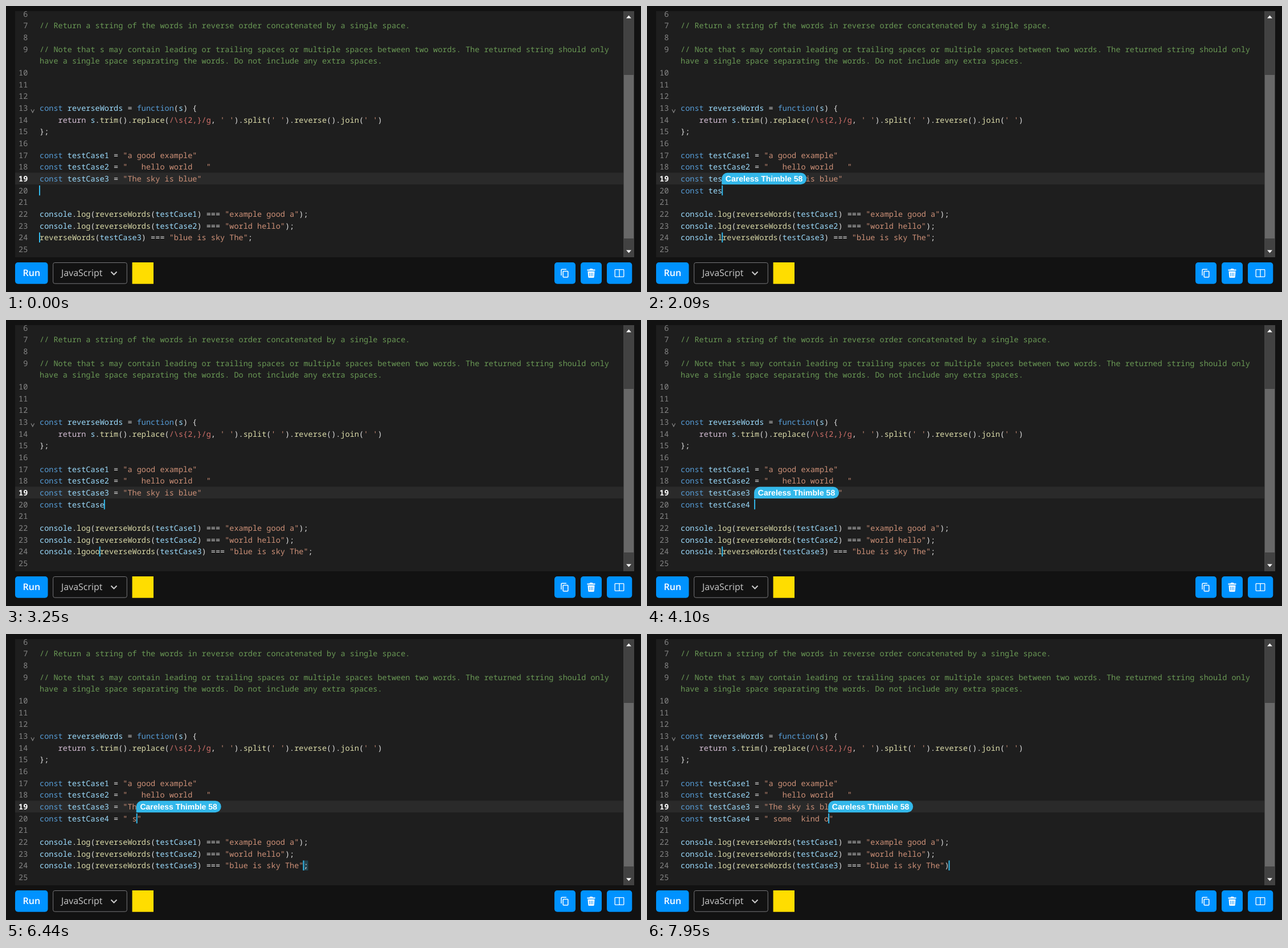
An HTML page with a canvas for the animation above (8 s loop, 1115 by 502 pixels).

```html
<!DOCTYPE html>
<html lang="en">
<head>
<meta charset="utf-8">
<title>Shared code editor</title>
<style>
  html, body { margin: 0; width: 100%; height: 100%; overflow: hidden; background: #121212; }
  canvas { display: block; }
</style>
</head>
<body>
<canvas id="stage" width="1115" height="502"></canvas>
<script>
const ctx = document.getElementById('stage').getContext('2d');
const LOOP = 8000, LEFT = 59, CHAR = 8.13, ROW = 20.66;
const CODE_FONT = '13.55px "Noto Sans Mono", monospace';
const CYAN = '#33b8ea', BLUE = '#0092ff', PLAIN = '#dcdcdc', COMMENT = '#6a9955';
const rowY = row => 14 + row * ROW;
const colX = col => LEFT + col * CHAR;

// Each entry is one visual row: [line number, code]
const rows = [
  [6, ''],
  [7, '// Return a string of the words in reverse order concatenated by a single space.'],
  [8, ''],
  [9, '// Note that s may contain leading or trailing spaces or multiple spaces between two words. The returned string should only'],
  ['', 'have a single space separating the words. Do not include any extra spaces.'],
  [10, ''], [11, ''], [12, ''],
  [13, 'const reverseWords = function(s) {'],
  [14, "    return s.trim().replace(/\\s{2,}/g, ' ').split(' ').reverse().join(' ')"],
  [15, '};'],
  [16, ''],
  [17, 'const testCase1 = "a good example"'],
  [18, 'const testCase2 = "   hello world   "'],
  [19, 'const testCase3 = "The sky is blue"'],
  [20, ''], [21, ''],
  [22, 'console.log(reverseWords(testCase1) === "example good a");'],
  [23, 'console.log(reverseWords(testCase2) === "world hello");'],
  [24, ''], [25, '']
];
const WRAPPED = 4, ACTIVE = 14, GUEST = 15, HOST = 19;

// '<' is a backspace
const guestKeys = 'const testCase4 = " some  kind o';
const guestTimes = [1010, 1290, 1500, 1720, 1840, 1890, 1950, 2010, 2060, 2260, 2480, 2710, 2800, 2880, 3560, 3720,
  4400, 4480, 5200, 6210, 6360, 6470, 6530, 6690, 7170, 7290, 7390, 7500, 7610, 7720, 7830, 7950];
const hostKeys = 'console.lgo(<<<gooo<<<<og(';
const hostTimes = [500, 680, 1010, 1100, 1180, 1260, 1340, 1420, 1500, 1580, 1660, 1730, 1790, 1900, 2030,
  2330, 2560, 2710, 2840, 3520, 3640, 3760, 3880, 4240, 4350, 4560];
const SELECT_END = 6210, SELECT = 6330, REPLACE = 7300;
const labelFades = [[1010, 1210, 1], [2950, 3250, -1], [3560, 3760, 1], [4520, 4820, -1], [6210, 6410, 1]];

const tokenPattern = /(\/\/.*)|(".*?"|'.*?')|(\/\\.*\/g)|\b(const|function)\b|\b(return)\b|(\w+(?=\())|(\w+)|[^\w"'\/]/g;
const tokenColors = [COMMENT, '#ce9178', '#d1706a', '#569cd6', '#d6c0d6', '#dcdcaa', '#9cdcfe'];

function typed(keys, times, t) {
  let text = '';
  [...keys].forEach((key, i) => {
    if (t >= times[i]) text = key === '<' ? text.slice(0, -1) : text + key;
  });
  return text;
}

function box(x, y, w, h, color, radius = 0) {
  ctx.fillStyle = color;
  ctx.beginPath();
  ctx.roundRect(x, y, w, h, radius);
  ctx.fill();
}

function outline(path, color, width) {
  ctx.strokeStyle = color;
  ctx.lineWidth = width;
  ctx.stroke(new Path2D(path));
}

function shape(path, color) {
  ctx.fillStyle = color;
  ctx.fill(new Path2D(path));
}

function label(text, x, y, font, color, align = 'left') {
  ctx.font = font;
  ctx.fillStyle = color;
  ctx.textAlign = align;
  ctx.fillText(text, x, y);
}

function codeRun(text, col, row, color) {
  [...text].forEach((ch, i) => {
    if (ch !== ' ') label(ch, colX(col + i), rowY(row) + 4.7, '500 ' + CODE_FONT, color);
  });
}

function codeLine(text, row) {
  if (row === WRAPPED) return codeRun(text, 0, row, COMMENT);
  for (const match of text.matchAll(tokenPattern)) {
    const kind = match.slice(1).findIndex(Boolean);
    codeRun(match[0], match.index, row, tokenColors[kind] || PLAIN);
  }
}

function caret(col, row) {
  box(colX(col) - 1, rowY(row) - 9, 2, 17.5, CYAN);
}

function nameTag(col, t) {
  let alpha = 0;
  for (const [from, to, sign] of labelFades) {
    alpha += sign * Math.min(1, Math.max(0, (t - from) / (to - from)));
  }
  if (alpha <= 0) return;
  ctx.globalAlpha = alpha;
  const x = colX(col) - 1, y = rowY(ACTIVE) - 10.5;
  box(x, y, 149, 20.5, CYAN, [10, 10, 10, 0]);
  label('Careless Thimble 58', x + 6.7, y + 14.9, 'bold 14px "Liberation Sans", Arial, sans-serif', '#fff');
  ctx.globalAlpha = 1;
}

function editor(t) {
  box(16, 9, 1068, 432, '#1e1e1e');
  box(16, rowY(ACTIVE) - 10.7, 1068, ROW, '#2a2a2a');

  const guest = typed(guestKeys, guestTimes, t);
  const prefix = typed(hostKeys, hostTimes, t);
  const host = prefix + 'reverseWords(testCase3) === "blue is sky The"' + (t < REPLACE ? ';' : ')');
  const selected = t >= SELECT && t < REPLACE;
  const hostCol = t < SELECT_END ? prefix.length : host.length - selected;
  if (selected) box(colX(hostCol), rowY(HOST) - 9, CHAR, 17.5, '#23434f');

  ctx.save();
  ctx.beginPath();
  ctx.rect(16, 9, 1068, 432);
  ctx.clip();
  rows.forEach(([number, code], row) => {
    const active = row === ACTIVE;
    label(number, 38.3, rowY(row) + 4.7, (active ? 'bold ' : '') + CODE_FONT, active ? '#fff' : '#858585', 'right');
    codeLine(code, row);
  });
  ctx.restore();
  outline('M44 181.5L46.8 187L49.6 181.5', '#8a8a8a', 1.1);

  codeLine(guest + (guest.includes('"') ? '"' : ''), GUEST);
  codeLine(host, HOST);
  caret(guest.length, GUEST);
  caret(hostCol, HOST);
  nameTag(guest.length, t);
}

function scrollbar() {
  box(1084, 9, 19, 432, '#424242');
  box(1085, 121, 17, 287, '#686868');
  shape('M1089 21.5h9l-4.5-5zM1089 428.5h9l-4.5 5z', '#fff');
}

function toolbar() {
  const font = '16px "Open Sans", sans-serif';
  box(16, 450, 57.5, 37.7, BLUE, 5);
  label('Run', 44.8, 474.3, '600 ' + font, '#fff', 'center');
  ctx.beginPath();
  ctx.roundRect(82.7, 450.5, 129.6, 36.7, 3);
  ctx.strokeStyle = '#77777a';
  ctx.lineWidth = 1;
  ctx.stroke();
  label('JavaScript', 97, 474, font, '#c9c9c9');
  outline('M184.5 466.5l5 5l5-5', '#c9c9c9', 2);
  box(221.6, 450, 37.4, 37.7, '#ffdd00');

  [[963, 37], [1009, 37], [1055, 44.3]].forEach(([x, w]) => box(x, 450, w, 37.7, BLUE, 5));
  outline('M975 473v-9.5q0-1.3 1.3-1.3h7.7M979.2 465.5h6.6q1 0 1 1v8.6q0 1-1 1h-6.6q-1 0-1-1v-8.6q0-1 1-1z', '#fff', 1.5);
  shape('M1020.5 462.5h4l1-1.5h4l1 1.5h4v2h-14zM1021.5 465.8h12l-.8 10q-.1 1.2-1.4 1.2h-7.6q-1.3 0-1.4-1.2z', '#fff');
  outline('M1024.7 468v6.5M1027.5 468v6.5M1030.3 468v6.5', BLUE, 1);
  outline('M1070 462.7h14q.8 0 .8.8v11q0 .8-.8.8h-14q-.8 0-.8-.8v-11q0-.8.8-.8zM1077 462.7v12.6', '#fff', 1.3);
}

function frame(now) {
  ctx.textRendering = 'geometricPrecision';
  box(0, 0, 1115, 502, '#121212');
  editor(now % LOOP);
  scrollbar();
  toolbar();
  requestAnimationFrame(frame);
}
requestAnimationFrame(frame);
</script>
</body>
</html>
```
